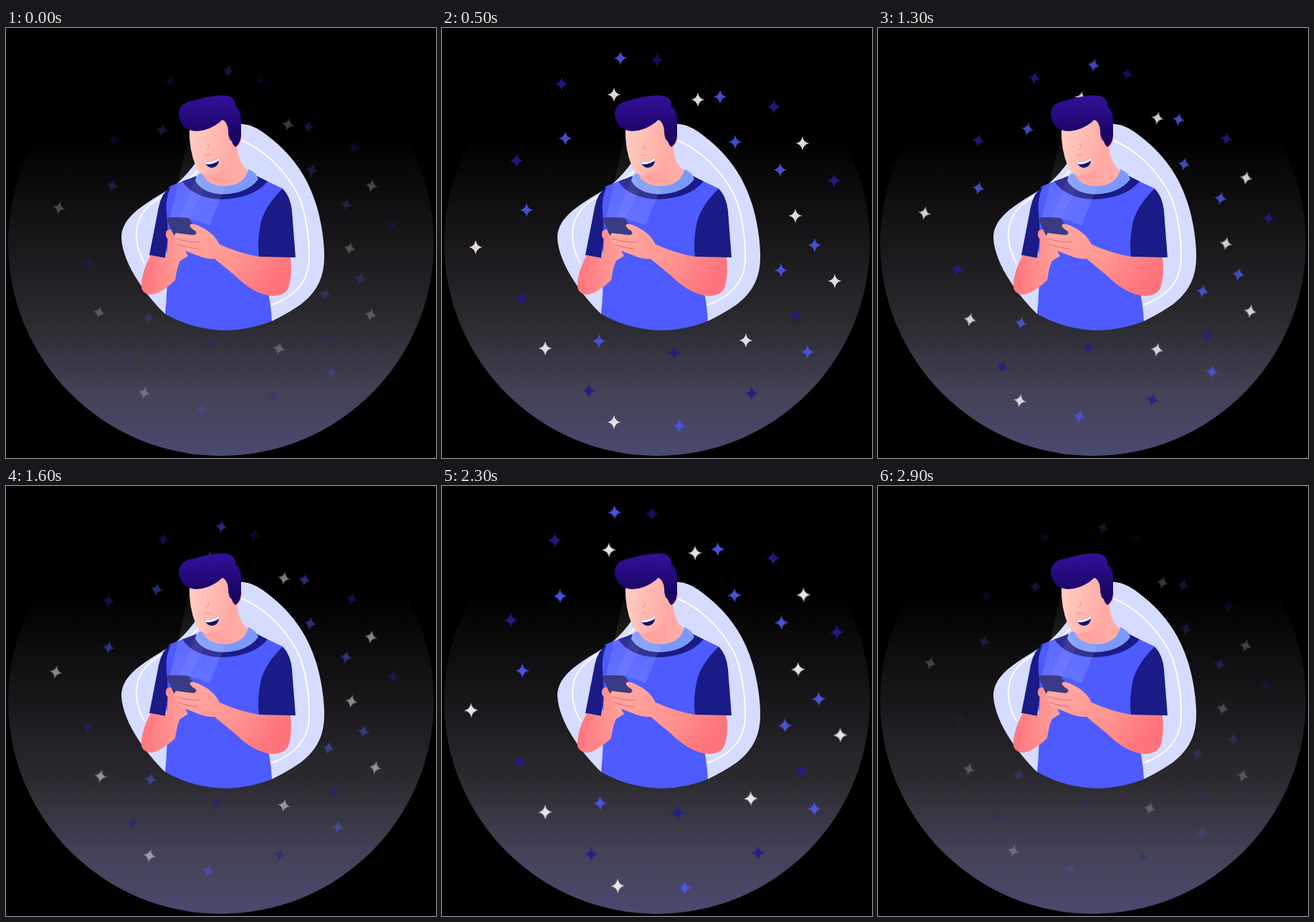
These frames come from a looping animation (600x600 px, 3000 ms). An HTML page:

```html
<!DOCTYPE html>
<html lang="en">
<head>
<meta charset="utf-8">
<title>Starry messenger</title>
<style>
  html, body { margin: 0; width: 100%; height: 100%; overflow: hidden; background: #000; }
  svg { display: block; width: 100vw; height: 100vh; }
</style>
</head>
<body>
<svg viewBox="0 0 600 600">
  <defs>
    <linearGradient id="night" gradientUnits="userSpaceOnUse" x1="0" y1="150" x2="0" y2="597">
      <stop offset="0" stop-color="#000"/>
      <stop offset=".34" stop-color="#19171a"/>
      <stop offset=".58" stop-color="#2b2a2f"/>
      <stop offset=".8" stop-color="#434256"/>
      <stop offset="1" stop-color="#4a4970"/>
    </linearGradient>
    <linearGradient id="hair" x1="0" y1="0" x2="0" y2="1">
      <stop offset="0" stop-color="#33119a"/>
      <stop offset=".7" stop-color="#1c0568"/>
      <stop offset="1" stop-color="#190560"/>
    </linearGradient>
    <linearGradient id="face" x1="0" y1="0" x2="1" y2=".3">
      <stop offset="0" stop-color="#ffcfc2"/>
      <stop offset="1" stop-color="#ffaaa4"/>
    </linearGradient>
    <linearGradient id="neck" x1="0" y1="0" x2="1" y2="0">
      <stop offset="0" stop-color="#ff9c9a"/>
      <stop offset="1" stop-color="#ffb0a8"/>
    </linearGradient>
    <linearGradient id="leftArm" x1="0" y1="0" x2="1" y2="0">
      <stop offset="0" stop-color="#ff747c"/>
      <stop offset="1" stop-color="#ffa49d"/>
    </linearGradient>
    <linearGradient id="rightArm" x1="0" y1="0" x2="1" y2=".5">
      <stop offset="0" stop-color="#ffaca3"/>
      <stop offset=".6" stop-color="#ff9591"/>
      <stop offset="1" stop-color="#ff747c"/>
    </linearGradient>
    <linearGradient id="beam" gradientUnits="userSpaceOnUse" x1="0" y1="275" x2="0" y2="140">
      <stop offset="0" stop-color="#fff" stop-opacity=".14"/>
      <stop offset="1" stop-color="#fff" stop-opacity=".03"/>
    </linearGradient>
  </defs>

  <rect width="600" height="600"/>
  <circle cx="300" cy="300" r="297" fill="url(#night)"/>
  <g id="stars"></g>

  <!-- backdrop -->
  <path fill="#d6dcff" d="M222 399C200 378 163 332 161 293C161 262 195 245 232 222C262 201 280 160 300 142C318 130 338 131 358 145C398 174 420 205 433 247C442 276 445 310 444 323C443 350 433 369 411 386Q392 399 371 409Z"/>
  <path fill="none" stroke="#fff" stroke-width="2" d="M326 156C358 168 385 194 404 226C418 250 424 293 423 325C421 358 398 377 369 387M275 192C254 215 234 226 211 239C188 254 181 272 182 294Q184 312 193 328"/>

  <!-- neck and shirt -->
  <path fill="url(#neck)" d="M272 195L322 158Q323 190 339 200L330 222L290 226L272 208Z"/>
  <path fill="#4d5bff" d="M264 207L228 221L216 250L225 320Q226 360 222 399Q260 421 308 422Q342 421 371 409Q369 366 352 320L386 224L348 206Q340 221 306 224Q276 222 272 205Z"/>
  <path fill="#1a1b86" d="M386 224Q397 235 399 255L404 320H353Q350 296 356 270Q362 248 386 224ZM230 221Q217 230 213 250L200 317L222 321Q228 288 224 258Q222 238 230 221Z"/>
  <path fill="#1a1b86" d="M265 207L246 214Q261 237 300 239Q345 238 365 214L347 205Q333 228 303 228Q275 227 265 207Z"/>
  <path fill="#7b99fb" d="M274 201Q265 205 264 213Q274 231 303 232Q337 231 352 211Q349 201 338 197Q334 219 305 221Q277 219 274 201Z"/>
  <path fill="url(#neck)" d="M276 203Q278 217 304 218Q328 216 338 199L322 186L276 200Z"/>

  <!-- head -->
  <path fill="#ff9f9b" d="M317 148Q328 141 329 151Q328 164 319 167Z"/>
  <path fill="url(#face)" d="M256 139Q255 170 265 193Q269 205 281 206Q306 203 321 178L319 160L312 127H265Z"/>
  <path fill="url(#hair)" d="M241 119Q242 104 262 101Q285 94 303 94Q321 95 320 109Q328 114 328 128V150Q327 162 320 166Q317 164 315 158Q310 155 310 143Q309 131 302 128Q286 143 265 144Q242 142 241 119Z"/>
  <path fill="none" stroke="#ff9b98" stroke-width="1.4" stroke-linecap="round" d="M282 162Q285 168 280 169M278 178Q282 176 285 178"/>
  <path fill="#17126b" d="M277 187Q289 188 297 181Q298 194 287 195Q280 194 277 187Z"/>
  <path fill="#fff" d="M277 187Q289 188 297 181V185Q289 191 279 190Z"/>

  <!-- arms, phone, hands -->
  <path fill="url(#leftArm)" d="M202 317Q188 343 189 363Q192 372 204 372Q218 369 236 352Q239 332 243 325L254 318L236 285Q231 278 224 283Q221 290 226 295L225 312L222 321Z"/>
  <path fill="#393b84" d="M228 264H251Q255 264 257 268L268 287Q269 292 264 292H240Q235 291 233 287L225 269Q224 265 228 264Z"/>
  <path fill="url(#rightArm)" d="M397 320Q400 345 394 363Q388 374 371 374Q345 371 320 346L291 322Q279 323 266 317L248 310Q240 306 242 302Q236 300 237 295Q233 291 237 286L262 289Q268 287 264 283Q255 278 257 274Q262 272 275 279Q291 287 298 302Q325 314 352 319Z"/>
  <path fill="none" stroke="#e9697c" stroke-width="1.2" stroke-linecap="round" d="M238 294Q252 299 270 299M241 302Q253 307 268 308"/>
  <path fill="url(#beam)" d="M229 264L257 142L264 176L275 202L305 225L284 275L254 265Z"/>
  <path fill="#fff" opacity=".06" d="M243 264L267 204L276 226L255 266Z"/>
</svg>
<script>
const LOOP = 1500, STEP = 100;
const STAR = 'M0-10Q1.3-1.3 9.5 0Q1.3 1.3 0 10Q-1.3 1.3-9.5 0Q-1.3-1.3 0-10';
const STARS = {
  '#4b55e6': [[249,42], [388,96], [172,154], [409,159], [472,198], [118,254], [520,303], [473,338], [219,437], [510,452], [331,555]],
  '#211c88': [[167,78], [463,110], [104,185], [547,213], [111,378], [494,401], [324,453], [205,506], [432,510]],
  '#200b60': [[300,45]],
  '#f6f0f4': [[240,93], [357,100], [503,161], [493,262], [47,306], [548,353], [424,436], [144,447], [240,550]],
};
// [time, angle, scale, opacity]
const KEYS = [
  [0, 13.6, .9135, .25], [200, 9, .936, .8], [400, 4, .97, .5], [500, 0, 1, .9],
  [700, -2.6, 1.032, 1], [800, -1.5, 1.026, .95], [900, 2.5, 1.004, .5],
  [1100, 7.3, .974, .6], [1300, 11.4, .9435, .85], [1400, 14.5, .921, .23],
  [LOOP, 13.6, .9135, .25],
];

const group = document.getElementById('stars');
for (const [color, places] of Object.entries(STARS)) {
  for (const [x, y] of places) {
    const star = document.createElementNS(group.namespaceURI, 'path');
    star.setAttribute('d', STAR);
    star.setAttribute('fill', color);
    star.setAttribute('transform', `translate(${x} ${y})`);
    group.append(star);
  }
}

function pose(t) {
  const i = KEYS.findIndex(key => key[0] > t);
  const a = KEYS[i - 1], b = KEYS[i];
  const k = (t - a[0]) / (b[0] - a[0]);
  return a.map((v, j) => v + (b[j] - v) * k);
}

const start = performance.now();
function draw(now) {
  const t = Math.floor(Math.max(0, now - start) / STEP) * STEP % LOOP;
  const [, angle, scale, opacity] = pose(t);
  group.setAttribute('transform', `translate(300 300) rotate(${angle}) scale(${scale}) translate(-300 -300)`);
  group.setAttribute('opacity', opacity);
  requestAnimationFrame(draw);
}
draw(start);
</script>
</body>
</html>
```
